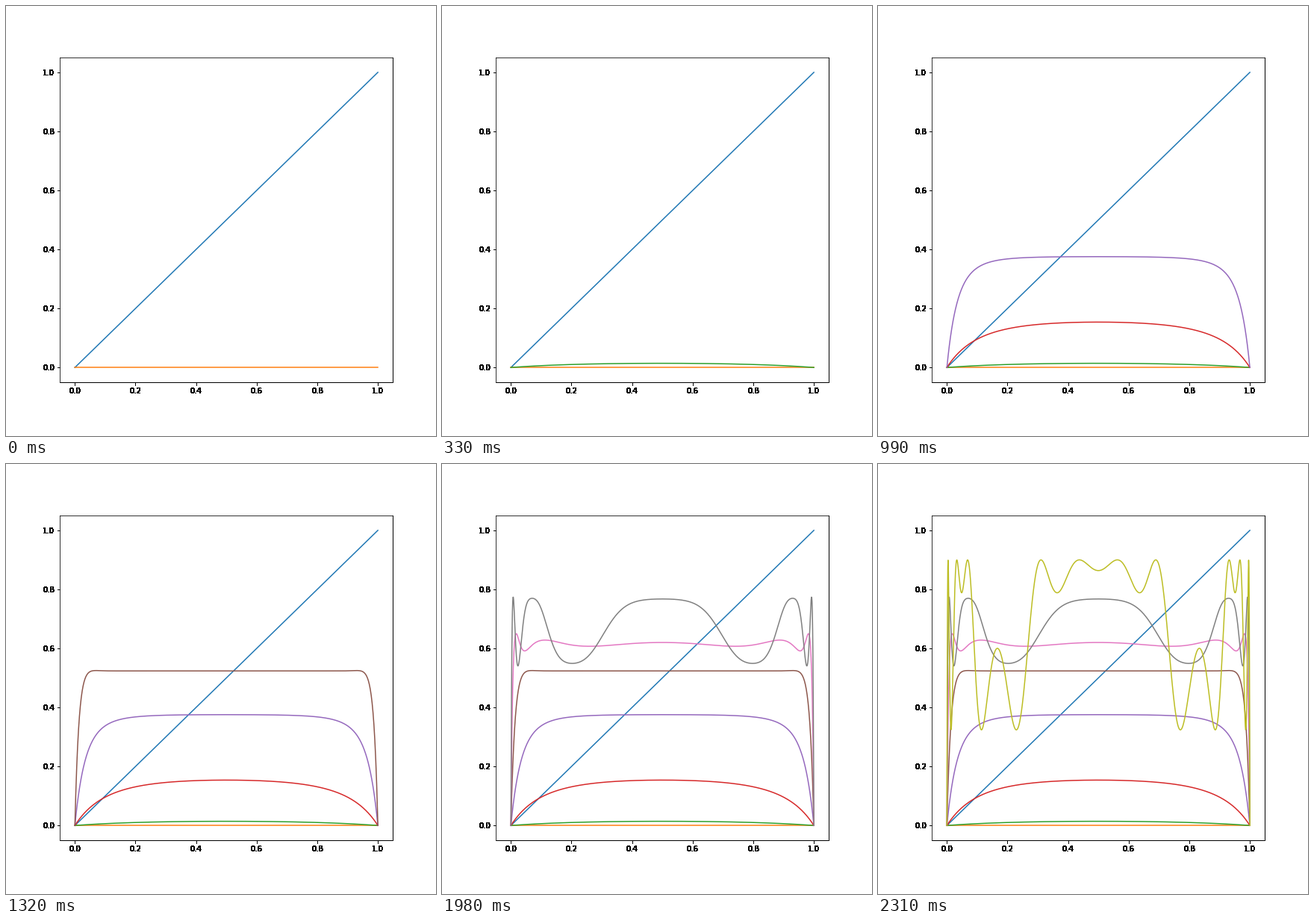
Write a matplotlib script that moves like this. It is 576 by 576 pixels and loops after 2640 ms.

```python
import matplotlib.pyplot as plt
import numpy as np
from matplotlib.animation import FuncAnimation

FRAMES, INTERVAL = 8, 330
ITERATIONS = 5


def logistic(x, r):
    """Apply the logistic map repeatedly."""
    for _ in range(ITERATIONS):
        x = r * x * (1 - x)
    return x


def solid(img, dpi):
    """Turn every touched pixel fully black."""
    out = np.zeros_like(img)
    out[..., 3] = img[..., 3] > 0
    return out, 0, 0


fig, ax = plt.subplots(figsize=(8, 8), dpi=72)
fig.subplots_adjust(left=0.125, right=0.9, bottom=0.125, top=0.88)

ticks = np.linspace(0, 1, 6)
ax.set(xlim=(-0.05, 1.05), ylim=(-0.05, 1.05), xticks=ticks, yticks=ticks)
for axis in (ax.xaxis, ax.yaxis):
    axis.set_agg_filter(solid)
for side in ("right", "bottom"):
    ax.spines[side].set_linewidth(1)

x = np.linspace(0, 1, 1000)
ax.plot(x, x)
curves = [ax.plot(x, logistic(x, 0.1 + 0.5 * i))[0] for i in range(FRAMES)]


def update(frame):
    for i, curve in enumerate(curves):
        curve.set_visible(i <= frame)
    return curves


anim = FuncAnimation(fig, update, frames=FRAMES, interval=INTERVAL,
                     repeat=True, repeat_delay=0, blit=False)
plt.show()
```
